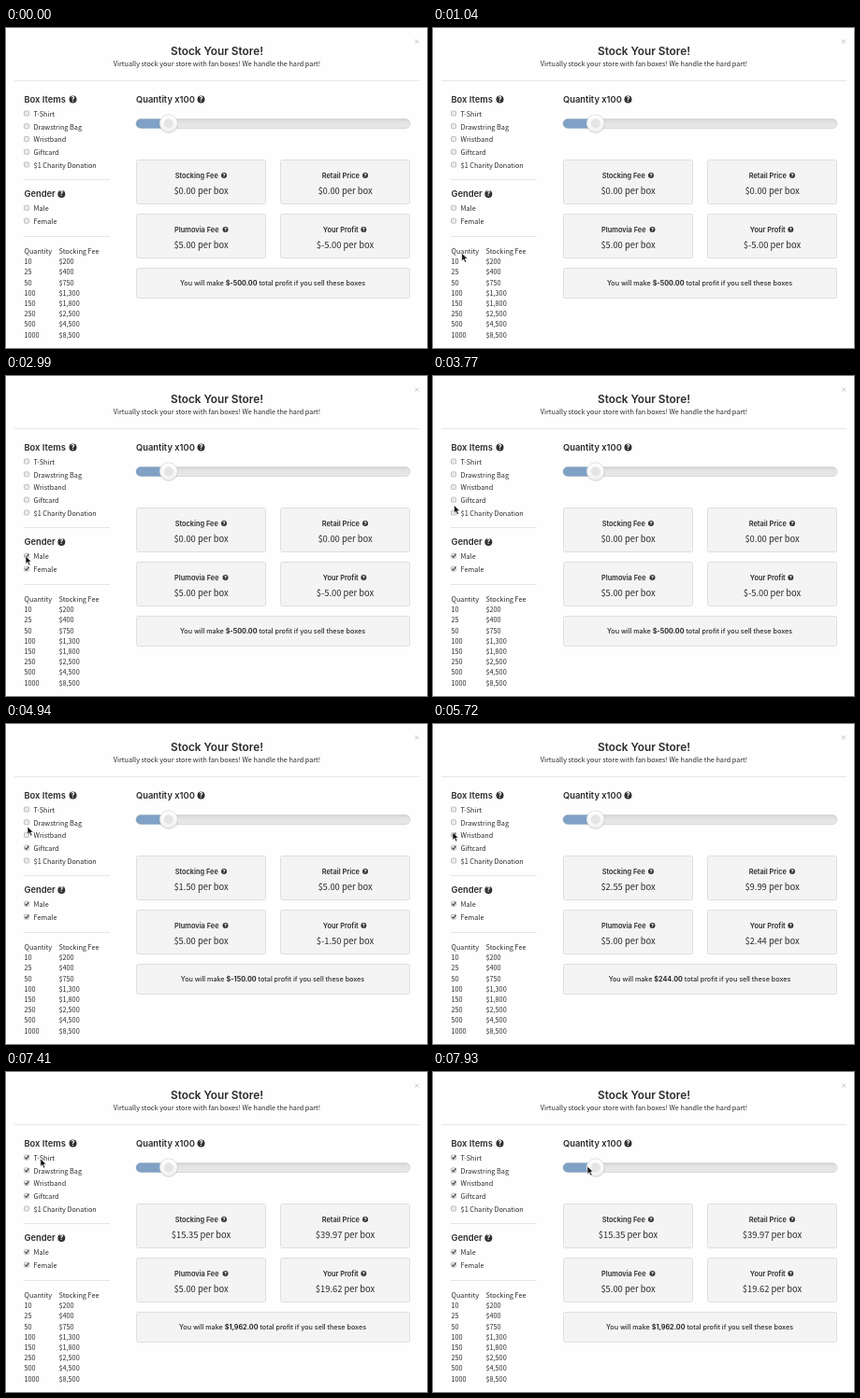
Recreate the animation shown at these times as an HTML page. Size 450 px wide and 343 px high, loop 8000 ms.

```html
<!DOCTYPE html>
<html lang="en">
<head>
<meta charset="utf-8">
<title>Stock Your Store!</title>
<style>
html, body { margin: 0; height: 100%; overflow: hidden; background: #fefefe; }
svg { display: block; width: 100%; height: 100%; }
text { fill: #2a2a2a; font: 7.27px "Noto Sans CJK JP", "Noto Sans CJK SC", "Open Sans", sans-serif; }
.head { font: 600 9.4px Inter, sans-serif; }
.title { font-size: 11.8px; }
.label { font-size: 7.4px; }
.total { font-size: 7.2px; font-weight: 500; }
.total tspan { font-weight: 700; }
.value { font-size: 9.4px; }
.mid { text-anchor: middle; }
.rule { stroke: #e6e6e6; }
.panel { fill: #f4f4f4; stroke: #dedede; }
</style>
</head>
<body>
<svg id="stage" viewBox="0 0 450 343">
  <defs>
    <linearGradient id="groove" x2="0" y2="1">
      <stop stop-color="#d4d4d4"/><stop offset=".4" stop-color="#e4e4e4"/><stop offset="1" stop-color="#e8e8e8"/>
    </linearGradient>
    <linearGradient id="knob" x2="0" y2="1">
      <stop stop-color="#fff"/><stop offset="1" stop-color="#f1f1f1"/>
    </linearGradient>
  </defs>
</svg>
<script>
const LOOP = 8000, STEP = 130, UNITS = 100, FEE = 5;
const stage = document.getElementById('stage');

function add(tag, attrs, text = '') {
  const el = document.createElementNS('http://www.w3.org/2000/svg', tag);
  for (const k in attrs) el.setAttribute(k, attrs[k]);
  el.textContent = text;
  return stage.appendChild(el);
}
const write = (x, y, text, cls = '') => add('text', { x, y, class: cls }, text);
const rule = (x1, x2, y) => add('line', { x1, x2, y1: y, y2: y, class: 'rule' });
const panel = (x, y, width, height) => add('rect', { x, y, width, height, rx: 2, class: 'panel' });

function help(cx, cy, r) {
  add('circle', { cx, cy, r, fill: '#333' });
  add('text', { x: cx, y: cy + r * .62, class: 'head mid', style: `fill:#fff;font-size:${r * 1.75}px;font-weight:800` }, '?');
}

function checkbox(y, label) {
  add('rect', { x: 19.5, y: y - 3, width: 5, height: 5, rx: 1, fill: '#ececec', stroke: '#b0b0b0', 'stroke-width': .8 });
  write(29.6, y + 2.8, label);
  return add('path', { d: `M20.5 ${y - .6}l1.3 1.6 2.6-3.6`, fill: 'none', stroke: '#3a3a3a', 'stroke-width': 1.1 });
}

function card(x, y, label, iconX) {
  panel(x + .5, y + .5, 138, 47);
  const mid = x + 69.5;
  write(mid - 4.7, y + 19.6, label, 'head label mid');
  help(iconX, y + 17, 3);
  return write(mid, y + 36.6, '', 'value mid');
}

// Header
write(225.5, 29, 'Stock Your Store!', 'head title mid');
write(225.5, 41, 'Virtually stock your store with fan boxes! We handle the hard part!', 'mid');
add('path', { d: 'M437 12.5l4 4m0-4l-4 4', stroke: '#c4c4c4' });
rule(9, 442, 56.5);

// Sidebar
write(19.4, 79.6, 'Box Items', 'head');
help(71.5, 76.5, 4);
write(19.4, 181, 'Gender', 'head');
help(59.3, 178, 4);
rule(19, 111, 162.5);
rule(19, 111, 223.5);

// Each option: row, label, time of click, cost, price
const options = [
  [92, 'T-Shirt', 7020, 7.8, 19.99],
  [105.8, 'Drawstring Bag', 6240, 5, 9.99],
  [119.5, 'Wristband', 5330, 1.05, 4.99],
  [133.2, 'Giftcard', 4160, 1.5, 5],
  [147, '$1 Charity Donation', Infinity, 1, 0],
  [193.3, 'Male', 2990, 0, 0],
  [207.2, 'Female', 1950, 0, 0]
].map(([y, label, at, cost, price]) => ({ at, cost, price, tick: checkbox(y, label) }));

[['Quantity', 'Stocking Fee'], [10, '$200'], [25, '$400'], [50, '$750'], [100, '$1,300'],
 [150, '$1,800'], [250, '$2,500'], [500, '$4,500'], [1000, '$8,500']].forEach((row, i) => {
  const y = 242 + i * 11.2;
  write(19.5, y, row[0]);
  write(56.5, y, row[1]);
});

// Slider
write(139, 79.6, 'Quantity x100', 'head');
help(208.5, 76.5, 4);
add('rect', { x: 139, y: 97.5, width: 293, height: 10, rx: 5, fill: 'url(#groove)', stroke: '#d2d2d2', 'stroke-width': .8 });
add('path', { d: 'M174 97.5H144a5 5 0 0 0 0 10H174z', fill: '#7fa1c5' });
add('circle', { cx: 173.8, cy: 102.9, r: 10.2, fill: '#000', opacity: .1 });
add('circle', { cx: 173.8, cy: 102.3, r: 9.5, fill: 'url(#knob)', stroke: '#d6d6d6', 'stroke-width': .7 });
add('circle', { cx: 173.8, cy: 102.3, r: 5, fill: '#e4e4e4' });

// Cards
const costText = card(139, 141, 'Stocking Fee', 233);
const priceText = card(293, 141, 'Retail Price', 384);
const feeText = card(139, 199, 'Plumovia Fee', 234.5);
const profitText = card(293, 199, 'Your Profit', 382.3);
panel(139.5, 257.5, 292, 32);
const total = write(285, 276.2, '', 'head total mid');

const cursor = add('path', { d: 'M0 0V8.4L2 6.6 3.4 9.9 5 9.2 3.5 6H6.2Z', fill: '#111', stroke: '#fff', 'stroke-width': .6 });

// Pointer stops: time, x, y
const stops = [
  [390, 62, 352], [1300, 23, 214], [1690, 20.8, 208], [2210, 20.8, 208],
  [2860, 21, 193], [3250, 21, 193], [3770, 22.5, 138.5], [4030, 21.5, 132],
  [4420, 21.5, 132], [4940, 23, 110], [5200, 21, 116], [5720, 21, 116],
  [6110, 21.5, 103], [6370, 21.5, 103], [6760, 22, 92], [7280, 22, 92], [7930, 165, 101]
];

function pointer(t) {
  const i = stops.findIndex(s => s[0] > t);
  if (i === 0) return stops[0].slice(1);
  if (i < 0) return stops.at(-1).slice(1);
  const [t0, x0, y0] = stops[i - 1], [t1, x1, y1] = stops[i];
  const p = (t - t0) / (t1 - t0), e = p * p * (3 - 2 * p);
  return [x0 + (x1 - x0) * e, y0 + (y1 - y0) * e];
}

const money = n => '$' + n.toLocaleString('en-US', { minimumFractionDigits: 2, maximumFractionDigits: 2 });
const perBox = n => money(n) + ' per box';

function draw(now) {
  const t = Math.floor((now % LOOP) / STEP) * STEP;
  let cost = 0, price = 0;
  for (const o of options) {
    const on = t >= o.at;
    o.tick.style.display = on ? '' : 'none';
    if (on) { cost += o.cost; price += o.price; }
  }
  const profit = price - cost - FEE;
  costText.textContent = perBox(cost);
  priceText.textContent = perBox(price);
  feeText.textContent = perBox(FEE);
  profitText.textContent = perBox(profit);
  total.innerHTML = `You will make <tspan>${money(profit * UNITS)}</tspan> total profit if you sell these boxes`;
  cursor.setAttribute('transform', `translate(${pointer(t)})`);
  requestAnimationFrame(draw);
}
requestAnimationFrame(draw);
</script>
</body>
</html>
```
